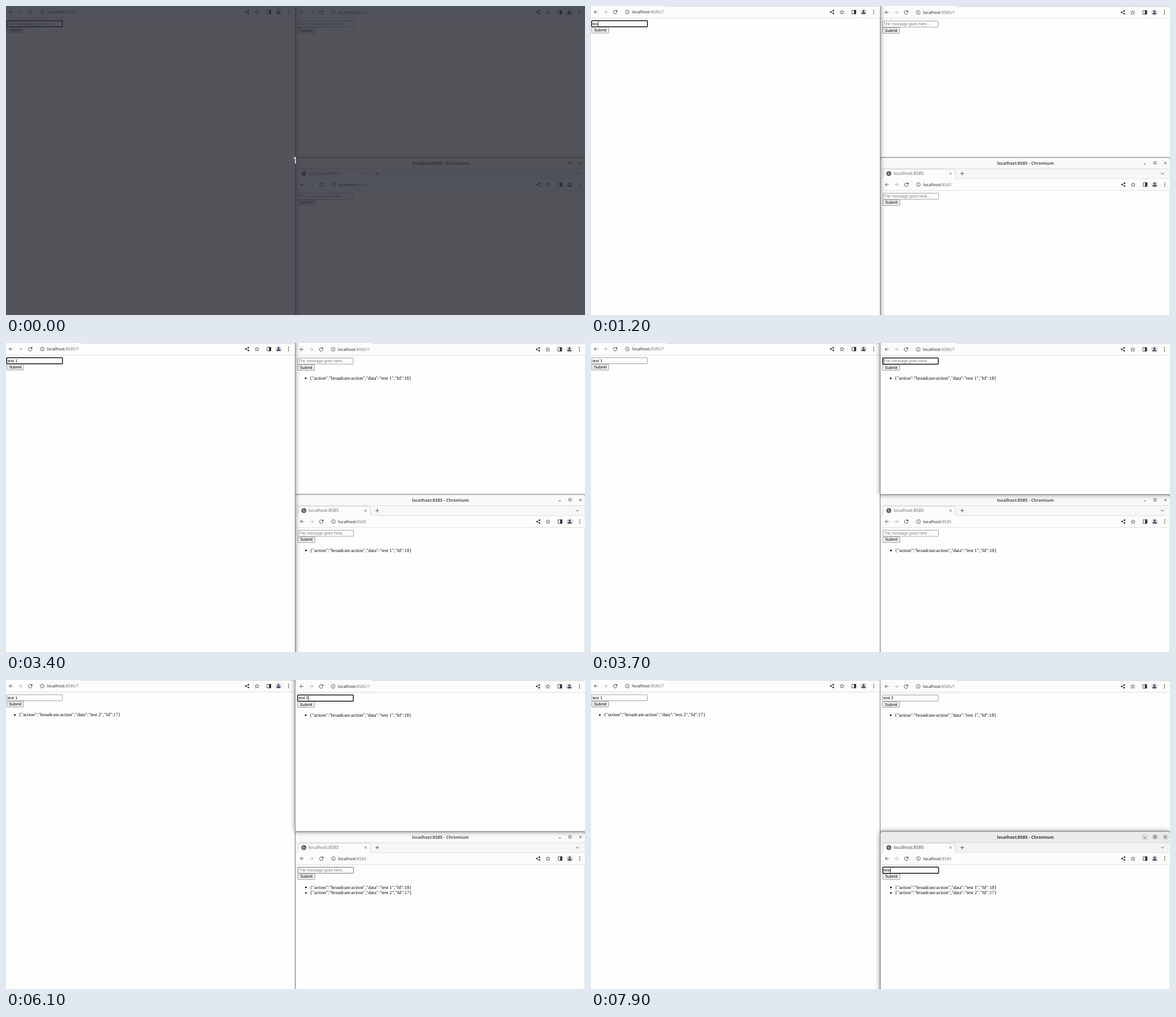
These frames come from a looping animation (1024x547 px, 8 s). An HTML page:

```html
<!DOCTYPE html>
<html lang="en">
<head>
<meta charset="utf-8">
<title>Broadcast demo</title>
<style>
html, body { margin: 0; width: 100%; height: 100%; overflow: hidden; background: #fefefd; }
svg { display: block; width: 100vw; height: 100vh; text-rendering: geometricPrecision; white-space: pre; }
.ui { font-family: "Noto Sans", "Open Sans", sans-serif; }
.form { font: 7.12px "Liberation Sans", Arial, sans-serif; }
.list { font: 8.545px "Liberation Serif", "Times New Roman", serif; }
.frame { fill: #fefefd; stroke: #8b8b89; stroke-width: .8; filter: drop-shadow(0 0 1.5px rgba(0,0,0,.22)); }
.active .frame { filter: drop-shadow(0 .8px 4px rgba(0,0,0,.5)); }
.line { fill: none; stroke: #333; stroke-width: 2.3; }
</style>
</head>
<body>
<svg id="stage" viewBox="0 0 1024 547" preserveAspectRatio="none"></svg>
<script>
const LOOP = 8000;
const INK = '#333';
const PLACEHOLDER = 'The message goes here...';
const stage = document.getElementById('stage');

const WINDOWS = {
  left: {
    x: 0, y: 0, path: '/?', frame: [-10, -40, 521.3, 600],
    typed: 'test 1', keys: [900, 1000, 1200, 1300, 1500, 1600],
    caret: [[100, 600], [900, 2200], [2800, 3400]],
    hover: [], inbox: [[5100, 'test 2', 17]]
  },
  right: {
    x: 514.4, y: .6, path: '/?', frame: [511.7, -40, 530, 308],
    typed: 'test 2', keys: [4000, 4100, 4200, 4400, 4600, 4900],
    caret: [[3700, 5400], [6100, 6600]],
    hover: [[3500, 7200]], inbox: [[1900, 'test 1', 18]]
  },
  bottom: {
    x: 514.9, y: 305.4, path: '', frame: [511.9, 268.3, 512.3, 320],
    typed: 'test', keys: [7500, 7600, 7700, 7900],
    caret: [[7200, LOOP]],
    hover: [[6100, 6200], [6700, LOOP]],
    inbox: [[1900, 'test 1', 18], [5100, 'test 2', 17]]
  }
};

// Stacking order, topmost last.
const stacking = t =>
  t < 3700 ? ['right', 'bottom', 'left'] :
  t < 7200 ? ['left', 'bottom', 'right'] : ['left', 'right', 'bottom'];

const within = (spans, t) => spans.some(([from, to]) => t >= from && t < to);

const rect = (x, y, w, h, fill, extra = '') =>
  `<rect x="${x}" y="${y}" width="${w}" height="${h}" fill="${fill}" ${extra}/>`;
const circle = (x, y, r, fill) => `<circle cx="${x}" cy="${y}" r="${r}" fill="${fill}"/>`;
const text = (x, y, body, cls, fill = '#000', extra = '') =>
  `<text x="${x}" y="${y}" class="${cls}" fill="${fill}" ${extra}>${body}</text>`;
const path = (d, stroke, width = .8, fill = 'none') =>
  `<path d="${d}" fill="${fill}" stroke="${stroke}" stroke-width="${width}"/>`;

// Icons are drawn on a 24-unit grid centred on (x, y).
const icon = (x, y, body, size = 8.6) =>
  `<g class="line" transform="translate(${x} ${y}) scale(${size / 24}) translate(-12 -12)">${body}</g>`;

const BACK = '<path d="M21 12H4M12.5 3.5L4 12l8.5 8.5"/>';
const FORWARD = '<path d="M3 12h17M11.5 3.5L20 12l-8.5 8.5" stroke="#a3a3a2" style="stroke:#a3a3a2"/>';
const RELOAD = '<path d="M18.5 7A8.5 8.5 0 1 0 20.3 14"/><path d="M21.5 2v8.5H13z" fill="#333" stroke="none"/>';
const INFO = '<circle cx="12" cy="12" r="9.4" stroke-width="1.9"/><path d="M12 11v6M12 6.6v2.4"/>';
const SHARE = '<path d="M18.5 5L5.5 12l13 7" stroke-width="1.9"/>' +
  [[18.5, 5], [5.5, 12], [18.5, 19]].map(([x, y]) => circle(x, y, 3.1, INK)).join('');
const STAR = '<path d="M12 3l2.7 6.3 6.8.6-5.2 4.5 1.6 6.7L12 17.5l-5.9 3.6 1.6-6.7-5.2-4.5 6.8-.6z" stroke-width="1.9"/>';
const SIDEBAR = '<path d="M2.5 3h19v18h-19z"/><path d="M13.5 3h8v18h-8z" fill="#333"/>';
const GLOBE = circle(12, 12, 11, '#4b4b4b') +
  '<path d="M4 9l5 4v5l3 3M9 3l3 3-2 3 6 3 1 5 3-3" stroke-width="2.6" style="stroke:#f6f6f5"/>';
const CROSS = '<path d="M5 5l14 14M19 5L5 19"/>';

function toolbar(win) {
  const dots = [7.6, 10.6, 13.6].map(y => circle(499.8, y, .85, INK)).join('');
  const avatar = circle(482, 10.7, 5.6, '#d6dbe2') + circle(482, 8.9, 1.75, '#3b4656') +
    path('M478.4 14v-.6c0-1.5 2-2.3 3.6-2.3s3.6.8 3.6 2.3v.6z', 'none', 0, '#3b4656');
  return rect(-2, .3, 520, 20.9, '#fcfcfb') +
    path('M-2 21.3H520', '#d5d5d3') +
    icon(8.5, 10.7, BACK) + icon(25.6, 10.7, FORWARD) + icon(42.8, 10.7, RELOAD, 9) +
    icon(64.2, 10.7, INFO, 8.8) +
    text(72.6, 13.3, `localhost<tspan fill="#777">:8585${win.path}</tspan>`, 'ui', '#262626', 'font-size="7.37"') +
    icon(426.4, 10.7, SHARE, 8.4) + icon(443.8, 10.7, STAR, 9) + icon(465, 10.7, SIDEBAR, 8.6) +
    avatar + dots;
}

const ADVANCE = { t: .278, e: .556, s: .5, ' ': .278 };
const caretOffset = s => [...s].reduce((sum, c) => sum + (ADVANCE[c] || .556) * 7.12, 0);

function form(win, focused, t) {
  const value = win.typed.slice(0, win.keys.filter(k => t >= k).length);
  const border = within(win.hover, t) ? '#3c3c3c' : '#7d7d7d';
  const field = focused
    ? rect(1.2, 25.9, 98.6, 10.9, '#fefefe', 'rx="1.1" stroke="#111" stroke-width="1.5"')
    : rect(1.3, 26, 98.4, 10.7, '#fefefe', `rx=".8" stroke="${border}" stroke-width=".75"`);
  return field +
    text(2.9, 33.9, value || PLACEHOLDER, 'form', value ? '#000' : '#777') +
    (within(win.caret, t) ? rect(3 + caretOffset(value), 27.2, .7, 8.6, '#000') : '') +
    rect(1.3, 37.8, 30, 10, '#efefef', 'rx="1" stroke="#7d7d7d" stroke-width=".75"') +
    text(5.3, 45.1, 'Submit', 'form');
}

function messages(win, t) {
  return win.inbox.filter(([at]) => t >= at).map(([, data, fd], i) => {
    const y = 64.3 + i * 9.6;
    return circle(15.6, y - 2.4, 1.45, '#000') +
      text(22.7, y, `{"action":"broadcast-action","data":"${data}","fd":${fd}}`, 'list');
  }).join('');
}

// Title bar and tab strip of the only window whose top edge is visible.
function titleBar(active) {
  const buttons = [979.4, 997.5, 1015.8];
  return path('M512.3 288V273q0-4.3 4.3-4.3H1019.6q4.3 0 4.3 4.3v15z', 'none', 0, active ? '#ebebea' : '#f9f9f8') +
    (active ? buttons.map(x => circle(x, 278, 5.6, '#d8d8d6')).join('') : '') +
    text(768.3, 280.7, 'localhost:8585 - Chromium', 'ui', active ? '#353535' : '#505050',
      'font-size="7.576" font-weight="700" text-anchor="middle"') +
    path('M977.4 279.3h4', INK) + path('M995.5 275.6h4v4h-4z', INK, .75) +
    path('M1013.8 276l4 4m0-4l-4 4', INK) +
    rect(512.3, 288, 512, 17.7, active ? '#f3f3f2' : '#f7f7f6') +
    path('M512.3 288H1024', '#cfcfcd', .7) +
    path('M512.3 305.7q4.2 0 4.2-4V292.5q0-3.6 3.6-3.6H640.5q3.6 0 3.6 3.6v9.2q0 4 4.2 4H1024', '#c6c6c4', .8, '#fcfcfb') +
    icon(526.7, 296.7, GLOBE, 8.4) +
    text(535.2, 299.3, 'localhost:8585', 'ui', active ? '#454545' : '#6c6c6c', 'font-size="7.89"') +
    icon(635.8, 296.7, CROSS, 6.8) +
    path('M653.2 296.7h6.6m-3.3-3.3v6.6', INK) +
    path('M1008 295.4l2.6 2.6 2.6-2.6', INK, .9);
}

function drawWindow(name, active, t) {
  const win = WINDOWS[name];
  const [x, y, w, h] = win.frame;
  const isBottom = name === 'bottom';
  return `<g class="${active ? 'active' : ''}">` +
    `<rect class="frame" x="${x}" y="${y}" width="${w}" height="${h}" rx="${isBottom ? 4.5 : 0}"/>` +
    `<clipPath id="${name}"><rect x="${x + .4}" y="${y + .4}" width="${w - .8}" height="${h - .8}" rx="${isBottom ? 4.2 : 0}"/></clipPath>` +
    `<g clip-path="url(#${name})">` + (isBottom ? titleBar(active) : '') +
    `<g transform="translate(${win.x} ${win.y})">` +
    toolbar(win) + (isBottom ? '' : path('M132 .3H520', '#bdbdbb')) +
    form(win, active, t) + messages(win, t) + '</g></g></g>';
}

function scene(t) {
  const order = stacking(t);
  const countdown = t < 100
    ? rect(0, 0, 1024, 547, '#272a33', 'opacity=".8"') +
      text(511.6, 279.3, '1', 'ui', '#fff', 'font-size="16.5" text-anchor="middle"')
    : '';
  return order.map((name, i) => drawWindow(name, i === 2, t)).join('') + countdown;
}

let shown = '';
function tick() {
  const markup = scene(performance.now() % LOOP);
  if (markup !== shown) stage.innerHTML = shown = markup;
  requestAnimationFrame(tick);
}
tick();
</script>
</body>
</html>
```
